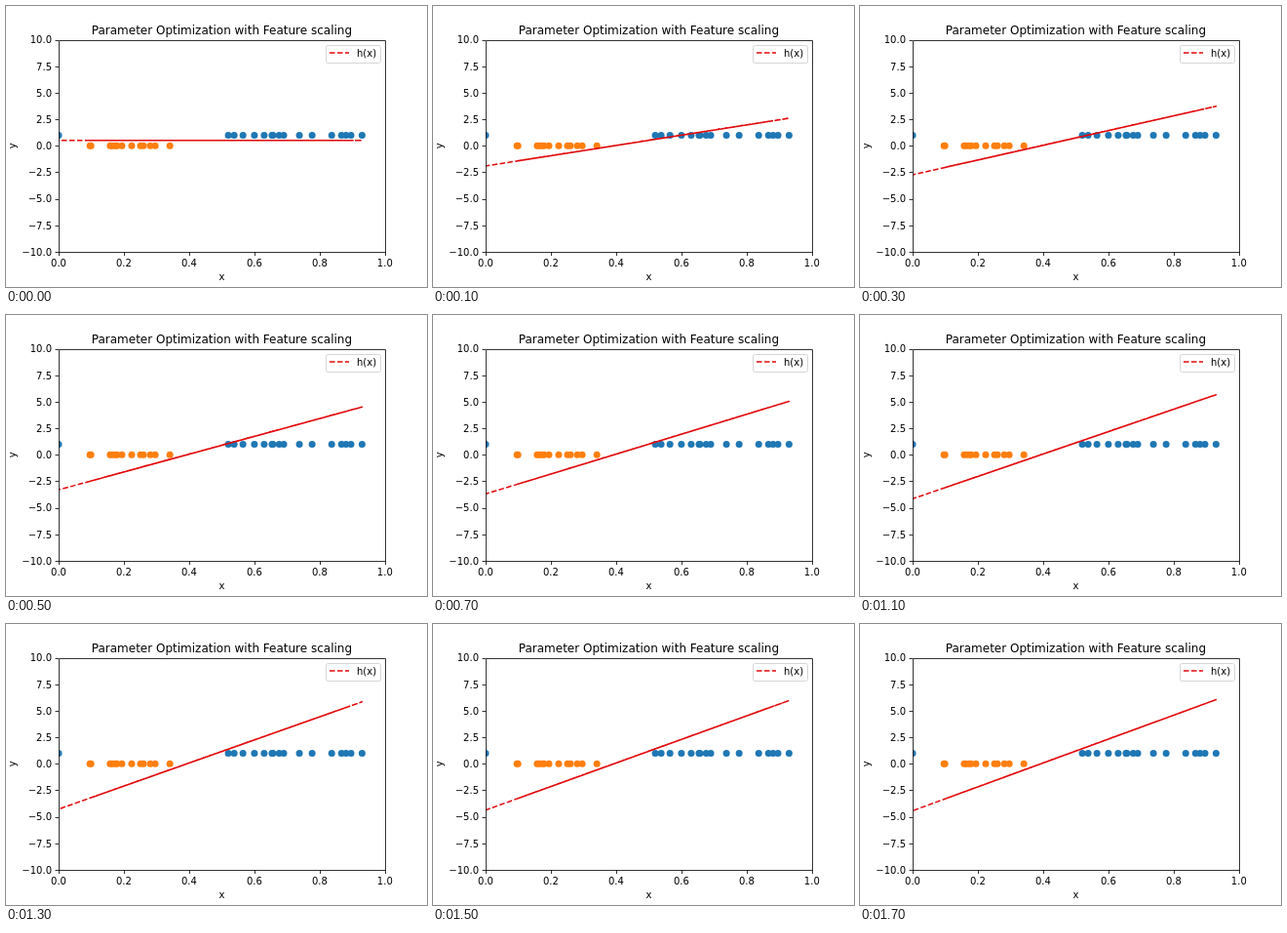
Animation of 432x288 px, one loop 1800 ms. Source, as an HTML page with a canvas:

```html
<!DOCTYPE html>
<html lang="en">
<head>
<meta charset="utf-8">
<title>Parameter optimization</title>
<style>
  html, body { margin: 0; overflow: hidden; background: #fff; }
  canvas { display: block; }
</style>
</head>
<body>
<canvas id="stage" width="432" height="288"></canvas>
<script>
const ctx = document.getElementById('stage').getContext('2d');
const LEFT = 54, RIGHT = 388.8, TOP = 34.56, BOTTOM = 252;
const MID = (LEFT + RIGHT) / 2;
const RED = '#e2090c';
const STEP = 100, STEPS = 18;

const high = [.52, .538, .565, .6, .63, .654, .657, .676, .69, .738, .777, .837, .867, .881, .896, .93];
const low = [.096, .099, .158, .164, .173, .179, .194, .224, .251, .26, .281, .296, .341];
// The fit is drawn through unsorted samples, so its dashes overlap into a solid line.
const visits = [...high.flatMap((x, i) => [x, low[i * 5 % low.length]]), 0];

const px = x => LEFT + x * (RIGHT - LEFT);
const py = y => BOTTOM - (y + 10) / 20 * (BOTTOM - TOP);
const snap = v => Math.floor(v + .5) + .5;

function text(str, x, y, align = 'center', size = 10) {
  ctx.font = `${size}px "DejaVu Sans", sans-serif`;
  ctx.textAlign = align;
  ctx.fillStyle = '#000';
  ctx.fillText(str, x, y);
}

function stroke(points, color, width, dash = []) {
  ctx.beginPath();
  points.forEach(([x, y]) => ctx.lineTo(x, y));
  ctx.strokeStyle = color;
  ctx.lineWidth = width;
  ctx.lineJoin = 'round';
  ctx.setLineDash(dash);
  ctx.stroke();
  ctx.setLineDash([]);
}

function dots(xs, y, color) {
  ctx.fillStyle = color;
  for (const x of xs) {
    ctx.beginPath();
    ctx.arc(px(x), py(y), 3.5, 0, 7);
    ctx.fill();
  }
}

function drawAxes() {
  for (let i = 0; i <= 5; i++) {
    const x = px(i / 5);
    stroke([[snap(x), BOTTOM], [snap(x), BOTTOM + 4]], '#000', .8);
    text((i / 5).toFixed(1), x, 267);
  }
  for (let v = -10; v <= 10; v += 2.5) {
    const y = py(v);
    stroke([[LEFT - 3.5, snap(y)], [LEFT, snap(y)]], '#000', .8);
    text(v.toFixed(1).replace('-', '\u2212'), LEFT - 7, y + 3.8, 'right');
  }
  ctx.lineWidth = .8;
  ctx.strokeRect(snap(LEFT), snap(TOP), snap(RIGHT) - snap(LEFT), snap(BOTTOM) - snap(TOP));
  text('x', MID, 281);
  ctx.save();
  ctx.translate(10, py(0));
  ctx.rotate(-Math.PI / 2);
  text('y', 0, 0);
  ctx.restore();
  text('Parameter Optimization with Feature scaling', MID, 28.6, 'center', 12);
}

function drawLegend() {
  ctx.beginPath();
  ctx.roundRect(328.5, 40.5, 56, 18, 2);
  ctx.fillStyle = 'rgba(255,255,255,.8)';
  ctx.fill();
  ctx.strokeStyle = '#d6d6d6';
  ctx.lineWidth = 1;
  ctx.stroke();
  stroke([[332, 48], [352, 48]], RED, 1.5, [5.55, 2.4]);
  text('h(x)', 360, 52, 'left');
}

function draw(step) {
  const slope = step ? 11.6 - 8.15 * .83 ** step : 0;
  const fit = x => step ? slope * (x - .393) : .5;

  ctx.fillStyle = '#fff';
  ctx.fillRect(0, 0, 432, 288);
  ctx.save();
  ctx.beginPath();
  ctx.rect(LEFT, TOP, RIGHT - LEFT, BOTTOM - TOP);
  ctx.clip();
  dots([0, ...high], 1, '#1f77b4');
  dots(low, 0, '#ff7f0e');
  stroke(visits.map(x => [px(x), py(fit(x))]), RED, 1.5, [5.55, 2.4]);
  ctx.restore();
  drawAxes();
  drawLegend();
}

function tick() {
  draw(Math.floor(performance.now() / STEP) % STEPS);
  requestAnimationFrame(tick);
}
tick();
</script>
</body>
</html>
```
